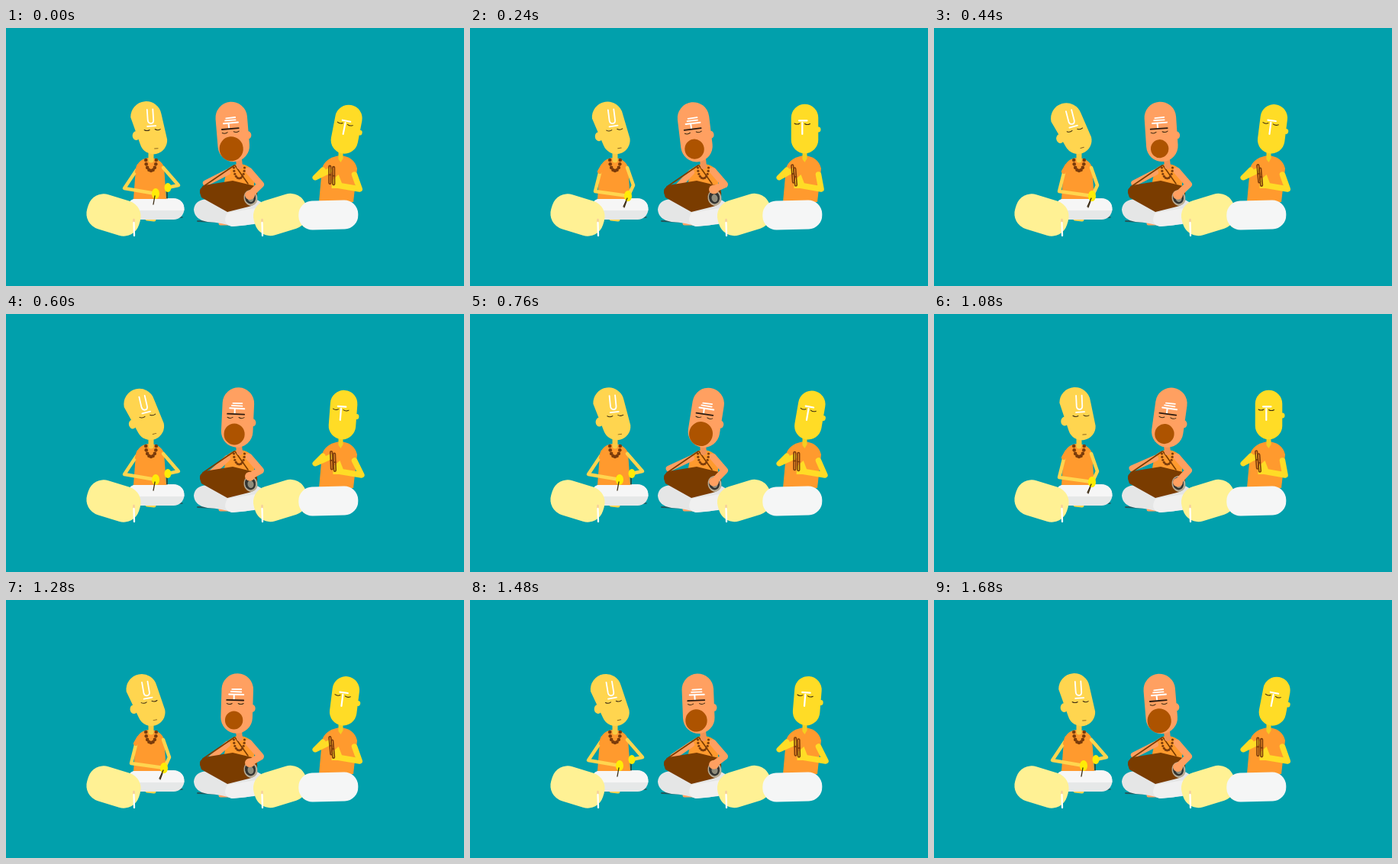
Animation, 600 px wide and 338 px high, one loop 1720 ms. Source, as an HTML page with a canvas:

```html
<!DOCTYPE html>
<html lang="en">
<head>
<meta charset="utf-8">
<style>
html, body { margin: 0; width: 100%; height: 100%; overflow: hidden; background: #01a0ac; }
canvas { display: block; }
</style>
</head>
<body>
<canvas id="stage" width="600" height="338"></canvas>
<script>
const ctx = document.getElementById('stage').getContext('2d');
const LOOP = 1720, STEP = 40, PHRASE = 1680, BEAT = PHRASE / 2, TAP = PHRASE / 5;
const TEAL = '#01a0ac', ORANGE = '#ff9a2e', BROWN = '#7a3c00', DARK = '#3a2a12', BEAD = '#7b3c0b';
const GOLD = '#ffd54f', SALMON = '#ffa061', YELLOW = '#ffdc26', CREAM = '#fff194', CYMBAL = '#ffec07';
ctx.lineCap = ctx.lineJoin = 'round';

// Cosine that peaks at the given time
const wave = (t, period, peak) => Math.cos(2 * Math.PI * (t - peak) / period);
const mix = (a, b, u) => a + (b - a) * u;
function ease(x) {
  const u = Math.min(1, Math.max(0, x));
  return u * u * (3 - 2 * u);
}

function line(points, color, width) {
  ctx.beginPath();
  for (let i = 0; i < points.length; i += 2) ctx.lineTo(points[i], points[i + 1]);
  ctx.strokeStyle = color;
  ctx.lineWidth = width;
  ctx.stroke();
}
function shape(d, color) {
  ctx.fillStyle = color;
  ctx.fill(new Path2D(d));
}
function trace(d, color, width) {
  ctx.strokeStyle = color;
  ctx.lineWidth = width;
  ctx.stroke(new Path2D(d));
}
function oval(x, y, rx, ry, color, angle = 0) {
  ctx.beginPath();
  ctx.ellipse(x, y, rx, ry, angle, 0, 7);
  ctx.fillStyle = color;
  ctx.fill();
}
// Rotates the drawing about a fixed point of the stage
function tilted(x, y, degrees, draw) {
  ctx.save();
  ctx.translate(x, y);
  ctx.rotate(degrees * Math.PI / 180);
  ctx.translate(-x, -y);
  draw();
  ctx.restore();
}
function pillow(x, y, w, h, r, angle, color) {
  tilted(x, y, angle, () => {
    ctx.beginPath();
    ctx.roundRect(x - w / 2, y - h / 2, w, h, r);
    ctx.fillStyle = color;
    ctx.fill();
  });
}
function beads(x, y, rx, ry, count, size) {
  for (let i = 0; i < count; i++) {
    const a = Math.PI * i / (count - 1);
    oval(x + rx * Math.cos(a), y + ry * Math.sin(a), size, size, BEAD);
  }
}
function eye(x, y) {
  trace(`M${x} ${y}q3.5 2.2 7 0`, DARK, 1);
}

function cymbalPlayer(t) {
  line([200, 249, 231, 248], '#24565a', 1.5);
  line([185, 250, 194, 251], GOLD, 5);
  line([214, 249, 222, 248], '#e8b93a', 4);
  pillow(196, 237, 75, 28, 14, 0, '#e6e8e8');
  shape('M158.5 239Q158 223.5 173 223.5H219Q234 224 233.5 239Z', '#f6f6f6');
  shape('M167 224L170 184Q174 171 187 170Q202 170 207 182L210 224Z', ORANGE);

  const open = ease(.5 + .9 * wave(t, BEAT, 740));
  const hand = { x: mix(207, 196, open), y: mix(220, 217, open) };
  const farHand = { x: mix(207, 212, open), y: mix(221, 209, open) };
  line([206, 183, mix(214, 226, open), 206, farHand.x, farHand.y], GOLD, 4.5);
  line([171, 186, mix(164, 155, open), mix(214, 210, open), hand.x, hand.y], GOLD, 4.5);
  line([174, 181, mix(170, 172, open), 188], ORANGE, 6);
  line([farHand.x - 1, farHand.y + 3, farHand.x + mix(-5, -1, open), farHand.y + 14], DARK, 1.3);
  oval(farHand.x, farHand.y, 4.5, 6, CYMBAL);
  oval(hand.x, hand.y, 5, 7, CYMBAL);
  line([hand.x - 1, hand.y + 3, hand.x + mix(-6, -3, open), hand.y + 14], DARK, 1.3);

  line([190, 164, 190, 173], '#f8cb45', 7);
  beads(190, 173, 6.8, 14, 9, 2.3);
  const tilt = -3.3 + 5.5 * wave(t, BEAT, 90) + 2.5 * wave(t, PHRASE, 1180);
  tilted(190, 172, tilt, () => {
    oval(170.5, 141, 5, 6, GOLD);
    shape('M163 117A20.3 20.3 0 0 1 203.3 113L211 146A18 18 0 0 1 176 153Z', GOLD);
    trace('M184.5 107L185.5 121Q186 125 189.5 125Q193 125 193 121L192 106.5', '#fff', 1.8);
    line([185, 129, 196, 128], '#fff', 1.8);
    eye(181, 133.5);
    eye(195, 132.5);
    line([194.5, 158, 199, 157.6], '#8a6420', 1);
  });
}

function drummer(t) {
  const tap = wave(t, TAP, 50);
  line([251, 253, 282, 254], '#24565a', 1.8);
  line([281, 256, 292, 256], SALMON, 5);
  shape('M264 224H326Q344 230 342 246Q336 258 296 260Q284 255 264 254Q247 251 246 238Q247 225 264 224Z', '#e5e6e6');
  shape('M290 242L340 234Q343 252 325 257L296 260Q282 257 290 242Z', '#f0f0f0');
  shape('M285 207L289 186Q297 178 306 178Q321 179 325 192V210Z', ORANGE);

  line([290, 189, 266 - 7 * tap, 205 - 3 * tap], SALMON, 8);
  line([299, 180, 258, 208], BROWN, 1.6);
  line([300, 180, 317, 204], BROWN, 1.6);
  shape('M254 216Q253 210 260 206L297 200L326 207Q330 212 329 222Q327 232 318 234L290 241L256 222Z', BROWN);
  oval(320.5, 222.5, 9, 10.5, '#b7ab94', -.2);
  oval(320, 222, 7, 8.5, '#333432', -.2);
  oval(320.5, 223, 4, 5, '#8f8c7c', -.2);
  line([318, 187, 333.5, 205, 319, 216 + 5 * tap], SALMON, 9);
  oval(319.5, 216 + 5 * tap, 6.5, 6, SALMON);

  line([305, 172, 306, 181], '#f29355', 8);
  beads(305.5, 183, 7, 14, 11, 1.6);
  const tilt = -.6 + 8.4 * wave(t, PHRASE, 950) + 2 * wave(t, BEAT, 0);
  tilted(304, 188, tilt, () => {
    oval(322.5, 142, 4, 5, SALMON);
    line([303, 117, 302, 154], SALMON, 41.5);
    line([296, 117, 308, 117], '#fff', 1.8);
    line([294.5, 120, 308, 120.5], '#fff', 1.8);
    line([292, 123.5, 311, 124], '#fff', 2);
    line([298.5, 124, 298.5, 130], '#fff', 2);
    line([289, 131, 311, 131.5], '#2b1a10', 1.8);
    eye(289, 135.5);
    eye(304, 135.5);
    const r = 14 + 2.1 * wave(t, BEAT, -30);
    oval(298.5, 157.5, r * .97, r, '#ad5300');
  });
}

function clapperPlayer(t) {
  const sway = wave(t, BEAT, 640), gap = 3.6 + 1.4 * wave(t, BEAT, -60);
  const x = 426.5 + 2 * sway;
  line([391, 259, 400, 260], '#e9c51e', 4);
  shape('M410 228L414 184Q418 170 437 167Q456 168 460 184L455 228Z', ORANGE);
  pillow(422.3, 245, 78, 38, 18, -1.5, '#f5f6f6');
  line([415, 186, 405, 196, x - 3, 187], YELLOW, 7);
  line([456.5, 192, 463 + 3 * sway, 211, x + 7, 206], YELLOW, 7.5);
  shape(`M${x} 200L${x + 9} 192L${x + 14} 205L${x + 7} 210H${x}Z`, YELLOW);
  tilted(x, 193, 2 * gap - 10, () => {
    for (const side of [-.5, .5]) {
      const left = x - 1.2 + side * gap, top = 181 + side * (8 - 1.4 * gap);
      ctx.beginPath();
      ctx.roundRect(left, top, 2.6, 24, 1.3);
      ctx.strokeStyle = BEAD;
      ctx.lineWidth = 1.6;
      ctx.stroke();
      line([left, top + 12, left + 2.6, top + 12], BEAD, 1.6);
    }
  });
  shape('M435.5 160H441.5V171L438.5 176L435.5 172Z', '#f4cf20');
  const tilt = 5.65 + 3 * wave(t, BEAT, -111) + 3.35 * wave(t, BEAT / 2, 0);
  tilted(439, 172, tilt, () => {
    oval(456.5, 133, 3, 3.5, YELLOW);
    line([438.5, 117.5, 438.5, 146.5], YELLOW, 35.5);
    line([431, 121.3, 441.5, 121.3], '#fff', 2.2);
    line([435.3, 124, 435.3, 139], '#fff', 2.2);
    eye(425, 125);
    eye(438.5, 125.5);
  });
}

function wick(x, y) {
  line([x, y, x, y + 3], '#f6cf9a', 2.5);
  line([x, y + 4, x + .5, y + 21], '#fff', 2.3);
}

function draw(now) {
  const t = Math.floor(now % LOOP / STEP) * STEP;
  ctx.fillStyle = TEAL;
  ctx.fillRect(0, 0, 600, 338);
  cymbalPlayer(t);
  drummer(t);
  pillow(141, 245, 71, 47, 21, 17, CREAM);
  pillow(359.5, 244.5, 71, 47, 21, -17, CREAM);
  wick(167.5, 251);
  wick(335.5, 251);
  clapperPlayer(t);
}

let start;
function tick(now) {
  start ??= now;
  draw(now - start);
  requestAnimationFrame(tick);
}
requestAnimationFrame(tick);
</script>
</body>
</html>
```
